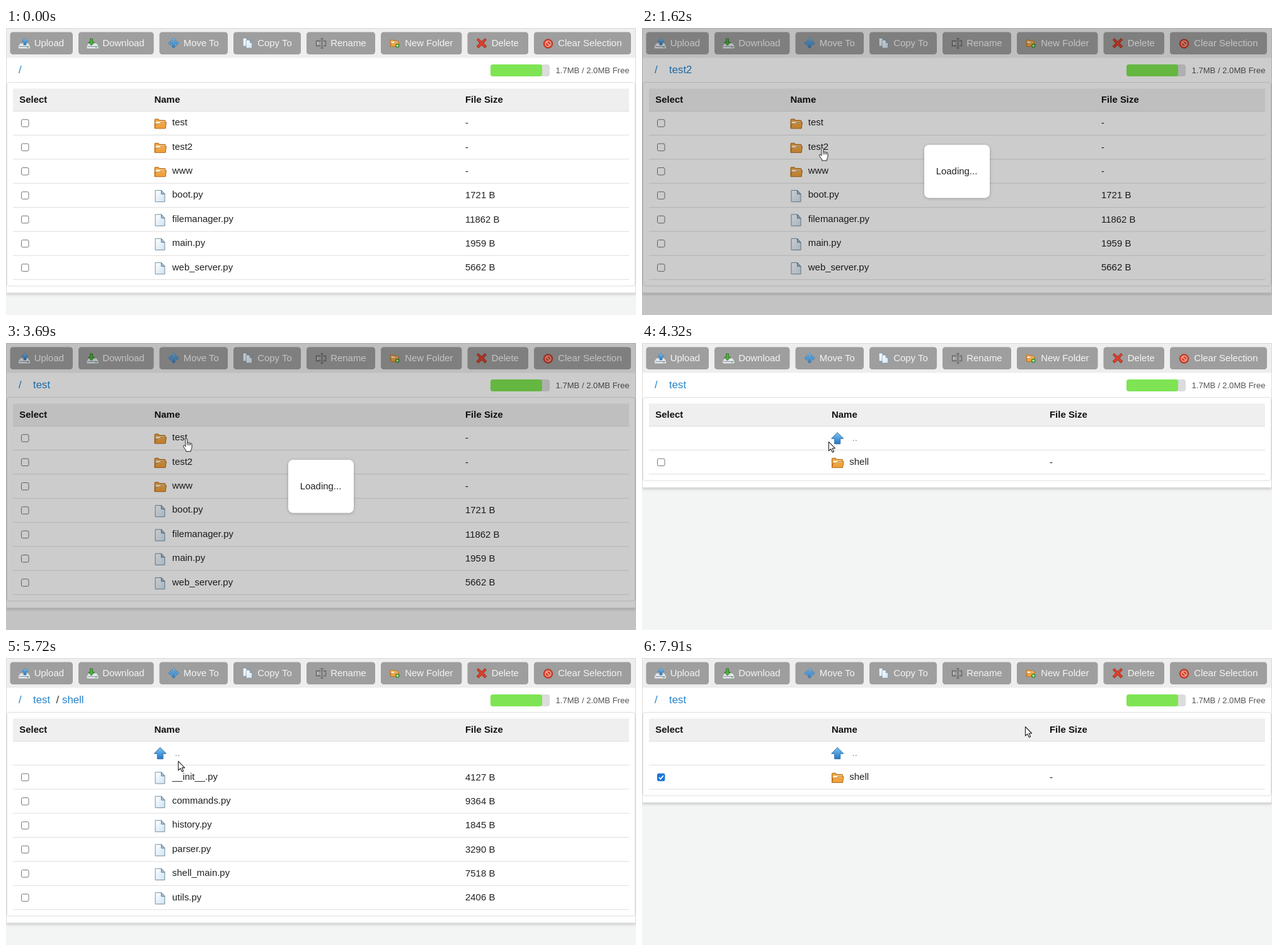
Animation, 1000 px wide and 457 px high, one loop 8000 ms. Source, as an HTML page:

```html
<!DOCTYPE html>
<html lang="en">
<head>
<meta charset="utf-8">
<title>File manager</title>
<style>
html, body { margin: 0; width: 100%; height: 100%; overflow: hidden; background: #f3f4f4; }
svg { display: block; width: 100%; height: 100%; }
text { font: 14.95px "Liberation Sans", Arial, sans-serif; fill: #222; white-space: pre; }
.btn { fill: #f4f4f4; }
.head { font-weight: bold; fill: #111; }
.crumb { font-size: 16.8px; fill: #2583cc; }
.sep { font-size: 16.8px; fill: #333; }
.free { font-size: 13.08px; fill: #555; }
.up { fill: #888; }
.line { stroke: #dedede; }
.folder { --f: #f0a23c; --e: #b06a1c; }
.red .folder { --f: #dc6a3e; --e: #a84a28; }
.cross { --x: #d8402c; }
.red .cross { --x: #e5662c; }
</style>
</head>
<body>
<svg viewBox="0 0 1000 457" preserveAspectRatio="none">
  <defs>
    <linearGradient id="blue" x2="0" y2="1"><stop stop-color="#7cc4f4"/><stop offset="1" stop-color="#2477c4"/></linearGradient>
    <linearGradient id="paper" x2="1" y2="1"><stop stop-color="#fff"/><stop offset="1" stop-color="#cfe3f1"/></linearGradient>
    <filter id="soft" x="-20%" y="-20%" width="140%" height="140%"><feDropShadow dx="0" dy="1" stdDeviation="2.5" flood-opacity=".25"/></filter>
    <g id="folder" class="folder" stroke-linejoin="round">
      <path d="M1 17V3.5q0-1 1-1h5l1.5 2H17q1 0 1 1V17z" style="fill:var(--f);stroke:var(--e)"/>
      <path d="M3 6.5h14v3H3z" fill="#fff3dc"/>
      <path d="M1 17.5 2.5 11l6-.5 2-2.5h9L18 17.5z" style="fill:var(--f);stroke:var(--e)"/>
      <path d="M3.5 11.5 9 11l2-2h7" fill="none" stroke="#ffd9a0" stroke-opacity=".7"/>
    </g>
    <g id="file" stroke-linejoin="round">
      <path d="M2 1h9.5l5.5 6v12.2H2z" fill="url(#paper)" stroke="#7390a6"/>
      <path d="M11.5 1v6H17z" fill="#a9c6dc" stroke="#5f8099"/>
    </g>
    <path id="up" d="M10 .8 19.5 10.5H14.5V19h-9v-8.500H.5z" fill="url(#blue)" stroke="#2d6da8" stroke-linejoin="round"/>
    <g id="tray">
      <path d="M3 11h12l2.500 4v3h-17v-3z" fill="#dfe5ea" stroke="#f6f6f6" stroke-width=".8"/>
      <path d="M1 15.500h16" stroke="#8795a0"/><path d="M13 16.800h3" stroke="#57b846"/>
    </g>
    <g id="upload"><use href="#tray"/><path d="M10 2 15 7.500h-3V13H8V7.500H5z" fill="url(#blue)" stroke="#3b7db8" stroke-width=".7"/></g>
    <g id="download"><use href="#tray"/><path d="M7 14 2 8.500h3V3h4v5.500h3z" fill="#4caf3c" stroke="#2f6f25" stroke-width=".8"/></g>
    <path id="move" d="M9 1.500 12.500 5.500h-2v3h3v-2L17.500 10l-4 3.500v-2h-3v3h2L9 18.500l-3.500-4h2v-3h-3v2L.5 10l4-3.500v2h3v-3h-2z" fill="url(#blue)" stroke="#3976ad" stroke-width=".6"/>
    <g id="copy"><use href="#file" transform="translate(.5 1.500) scale(.62 .7)"/><use href="#file" transform="translate(5.500 4.500) scale(.62 .7)"/></g>
    <g id="rename" fill="none" stroke="#666" stroke-width="1.300"><path d="M9 6.500H2v8h7M13 6.500h4v8h-4M11 3v15M9 3h4M9 18h4"/><path d="M4.500 8.500v4" stroke="#ddd"/></g>
    <g id="newdir"><use href="#folder" transform="translate(1 3) scale(.72)"/><path d="M12.800 11v6.500M9.500 14.200h6.600" stroke="#2f7f27" stroke-width="3.800"/><path d="M12.800 12v4.500M10.500 14.200h4.600" stroke="#b9ee9a" stroke-width="1.500"/></g>
    <path id="delete" class="cross" d="M3.500 2.500 9 7.500l5.500-5 2 2.500-4.500 5 5 5-3 3L9 13l-5 5-3-3 5-5-4.500-5z" style="fill:var(--x)" stroke="#8e2c1c" stroke-width=".8"/>
    <g id="clear" class="cross"><circle cx="9" cy="11" r="7.300" style="fill:var(--x)" stroke="#9c3320" stroke-width=".8"/><circle cx="9" cy="11" r="4.300" fill="none" stroke="#f0b3a4" stroke-width="1.400"/><path d="m6 8 6 6" stroke="#f0b3a4" stroke-width="1.500"/></g>
  </defs>
  <g id="page"></g>
  <g id="cursor" stroke="#222" stroke-linejoin="round">
    <path id="arrow" d="M0 .5V15l3.400-3.100 2.500 5.300 2.300-1-2.400-5.200h4.400z" fill="#fff" stroke-width="1.100"/>
    <path id="hand" d="M-1.600 13V1.800q0-1.500 1.500-1.500t1.500 1.500V7q1.400-1.100 2.400.2 1.500-.8 2.300.5 2.200-.4 2.400 1.600v5q0 2-1.600 4v2.400H-.8v-2Q-3 16.500-5 12.800q-.5-1.800 1-1.900 1.400.2 2.400 2.100M1.400 7v4M3.800 7.500V11M6.100 8v3" fill="#fff"/>
  </g>
</svg>
<script>
const LOOP = 8000, PITCH = 38.35;
const $ = id => document.getElementById(id);
const text = (x, y, s, cls = "") => `<text x="${x}" y="${y}" class="${cls}">${s}</text>`;
const rect = (x, y, w, h, fill, more = "") => `<rect x="${x}" y="${y}" width="${w}" height="${h}" fill="${fill}" ${more}/>`;
const icon = (id, x, y) => `<use href="#${id}" x="${x}" y="${y}"/>`;

const buttons = [
  ["upload", "Upload", 6.5, 99.5], ["download", "Download", 115, 119.5], ["move", "Move To", 243.5, 108.5],
  ["copy", "Copy To", 361, 107], ["rename", "Rename", 477, 109], ["newdir", "New Folder", 595, 128.5],
  ["delete", "Delete", 732.5, 96.5], ["clear", "Clear Selection", 838, 154]
];

// Rows without a size are folders; ".." is the parent link.
const pages = {
  root: { name: 235.5, size: 729, rows: [["test"], ["test2"], ["www"], ["boot.py", 1721], ["filemanager.py", 11862], ["main.py", 1959], ["web_server.py", 5662]] },
  test2: { name: 256, size: 703, rows: [[".."], ["__init__.py", 13860], ["editor.py", 12608]] },
  test: { name: 301, size: 647, rows: [[".."], ["shell"]] },
  shell: { name: 235.5, size: 729, rows: [[".."], ["__init__.py", 4127], ["commands.py", 9364], ["history.py", 1845], ["parser.py", 3290], ["shell_main.py", 7518], ["utils.py", 2406]] }
};

const states = [
  { t: 0, page: "root", path: [], red: true },
  { t: 580, page: "root", path: [] },
  { t: 1390, page: "root", path: ["test2"], busy: true },
  { t: 1730, page: "test2", path: ["test2"] },
  { t: 2790, page: "test2", path: [], busy: true },
  { t: 2940, page: "root", path: [] },
  { t: 3690, page: "root", path: ["test"], busy: true },
  { t: 3770, page: "test", path: ["test"] },
  { t: 4950, page: "test", path: ["test", "shell"], busy: true },
  { t: 5030, page: "shell", path: ["test", "shell"] },
  { t: 6060, page: "shell", path: ["test"], busy: true },
  { t: 6150, page: "test", path: ["test"] },
  { t: 7050, page: "test", path: ["test"], checked: true }
];

// Pointer moves: start, end, target x, target y
const start = [760, 100];
const moves = [
  [580, 1290, 286.5, 190.5], [2270, 2590, 293, 157], [3340, 3410, 286.5, 152], [4170, 4720, 340, 178],
  [5440, 5820, 260, 161], [6410, 6910, 29, 186], [7120, 7910, 608.5, 109]
];
const handTimes = [[1235, 2300], [2540, 2940], [3375, 3770], [4640, 5030], [5770, 6150]];

function checkbox(y, on) {
  const box = rect(24.5, y - 5.7, 11.5, 11.5, on ? "#1a76d8" : "#fff", `rx="2" stroke="${on ? "#1a76d8" : "#767676"}"`);
  return on ? box + `<path d="m27 ${y + .3} 2.400 2.500 4.500-5.300" fill="none" stroke="#fff" stroke-width="1.800"/>` : box;
}

function row([name, size], i, page, checked) {
  const top = 132.5 + i * PITCH, mid = top + 18.8, base = top + 22.9, x = page.name;
  const line = `<path class="line" d="M11 ${top + PITCH - .3}H989"/>`;
  if (name === "..") return line + icon("up", x - .8, mid - 9.6) + text(x + 32.5, base + .5, name, "up");
  return line + checkbox(mid + .2, checked)
    + (size ? icon("file", x - .5, mid - 8.8) : icon("folder", x - .5, mid - 8.8))
    + text(x + 28.3, base, name)
    + text(page.size, base + .9, size ? size + " B" : "-");
}

function crumbs(path) {
  let out = text(20, 72, "/", "crumb");
  if (path[0]) out += text(43, 72, path[0], "crumb");
  if (path[1]) out += text(79.5, 72, "/", "sep") + text(89, 72, path[1], "crumb");
  return out;
}

function draw(s) {
  const page = pages[s.page], end = 132.5 + page.rows.length * PITCH;
  return rect(0, 0, 1000, 457, "#f3f4f4")
    + rect(.5, .5, 999, end + 20.5, "#fff", 'stroke="#dadada" filter="url(#soft)"')
    + rect(1, 1, 998, 46.5, "#eee")
    + buttons.map(([id, label, x, w]) => rect(x, 6.5, w, 35.5, "#9e9e9e", 'rx="4.500"')
      + icon(id, x + 13.5, 14) + text(x + 38.2, 28.7, label, "btn")).join("")
    + crumbs(s.path)
    + rect(769, 58, 94, 19, "#dcdcdc", 'rx="4"') + rect(769, 58, 82, 19, "#7ee453", 'rx="4"')
    + text(872.5, 72, "1.7MB / 2.0MB Free", "free")
    + rect(1.5, 86.5, 997, end - 76.5, "#fff", 'rx="4" stroke="#dedede"')
    + rect(11, 96.5, 978, 36, "#efefef") + '<path class="line" d="M11 132.500H989"/>'
    + text(21.3, 119, "Select", "head") + text(page.name, 119, "Name", "head") + text(page.size, 119, "File Size", "head")
    + page.rows.map((r, i) => row(r, i, page, s.checked)).join("")
    + (s.busy ? rect(0, 0, 1000, 457, "#000", 'opacity=".2"') : "");
}

const dialog = rect(448, 186, 104, 84.5, "#fff", 'rx="8" filter="url(#soft)"') + text(466.7, 233, "Loading...");

function pointer(t) {
  let [x, y] = start;
  for (const [a, b, tx, ty] of moves) {
    if (t < a) break;
    const p = Math.min(1, (t - a) / (b - a)), e = p * p * (3 - 2 * p);
    x += (tx - x) * e;
    y += (ty - y) * e;
  }
  return [x, y];
}

let shown;
function update(t) {
  const s = states.findLast(k => k.t <= t);
  if (s !== shown) {
    shown = s;
    $("page").setAttribute("class", s.red ? "red" : "");
    $("page").innerHTML = draw(s) + (s.busy ? dialog : "");
  }
  const hand = handTimes.some(([a, b]) => t >= a && t < b);
  $("cursor").setAttribute("visibility", t < 580 ? "hidden" : "visible");
  $("cursor").setAttribute("transform", `translate(${pointer(t)})`);
  $("hand").style.display = hand ? "" : "none";
  $("arrow").style.display = hand ? "none" : "";
}

const began = performance.now();
function tick() {
  update((performance.now() - began) % LOOP);
  requestAnimationFrame(tick);
}
tick();
</script>
</body>
</html>
```
